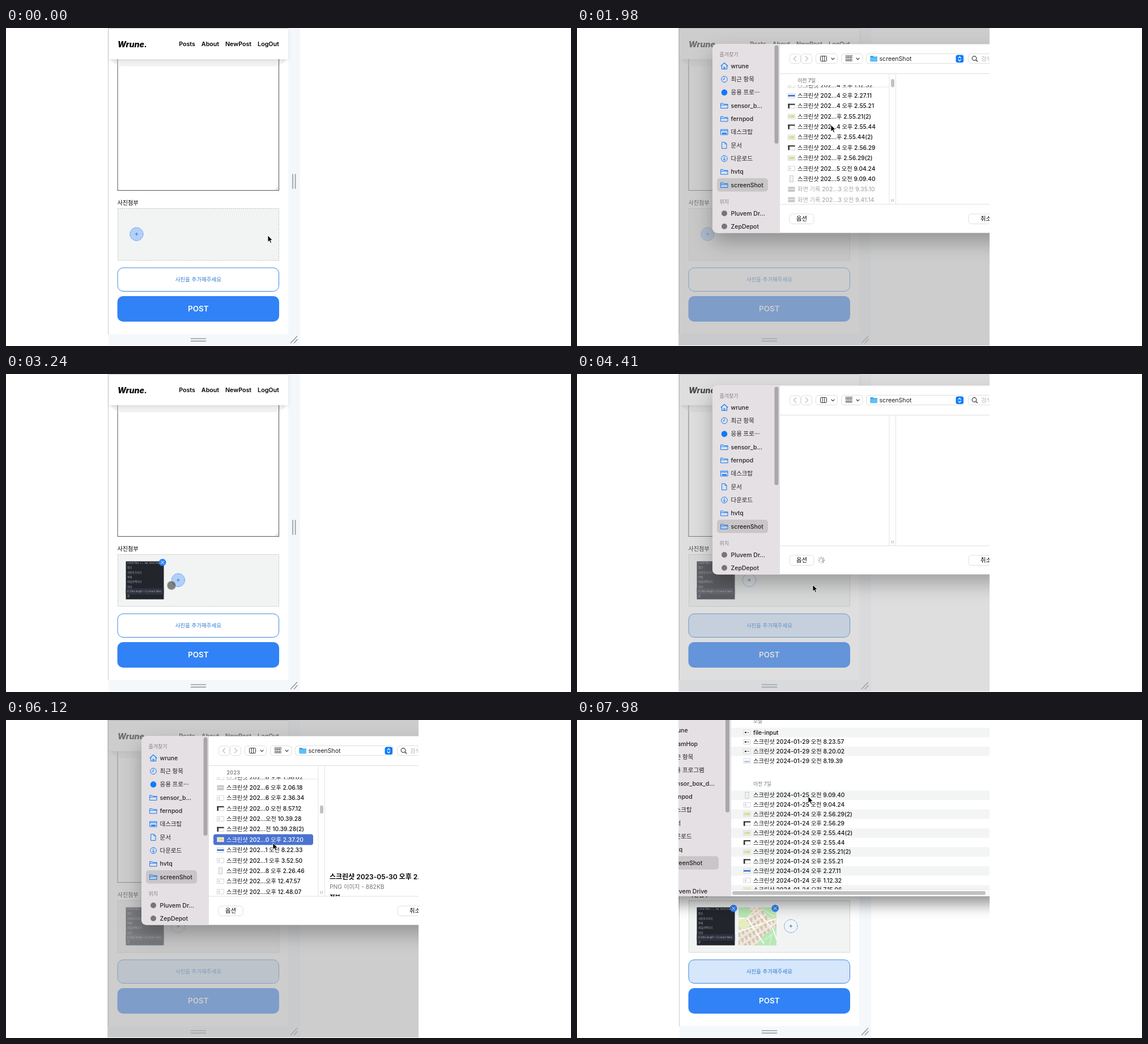
Write an HTML page that moves like this. It is 997x561 px and loops after 8 s.

```html
<!DOCTYPE html>
<html lang="ko">
<head>
<meta charset="utf-8">
<title>Photo upload</title>
<style>
html, body { margin: 0; width: 100%; height: 100%; overflow: hidden; background: #fff; }
svg { display: block; width: 100vw; height: 100vh; font-family: Inter, "Noto Sans CJK KR", "Noto Sans CJK", sans-serif; }
.line { fill: none; stroke-linecap: round; stroke-linejoin: round; }
.anim { animation: 8s linear infinite; }
.step { animation: 8s step-end infinite; }
#cursor { animation-name: pointer; animation-timing-function: ease-in-out; }
#arrow { animation-name: arrow; }
#touch { animation-name: touch; }
#dim { animation-name: dim; }
#sheet { animation-name: sheet; }
#files { animation-name: ready; }
#spinner { animation-name: busy; }
#spinner g { animation: spin .8s steps(8) infinite; }
#rows { animation-name: scroll; }
#thumb { animation-name: thumb; }
#week { animation-name: week; }
#year { animation-name: year; }
#pick1 { animation-name: pick1; }
#pick2 { animation-name: pick2; }
#photo1 { animation-name: photo1; }
#photo2 { animation-name: photo2; }
#plus { animation-name: plus; }
#plusFill { animation-name: plusFill; }
#hover { animation-name: hover; }
#finder { animation-name: finder; }
#sheetBase { filter: drop-shadow(0 16px 17px rgba(0,0,0,.28)); }
#finderBase { filter: drop-shadow(0 14px 13px rgba(0,0,0,.42)); }
#header { filter: drop-shadow(0 2px 3px rgba(0,0,0,.1)); }

@keyframes pointer {
  0%, 10.125% { transform: translate(462px, 366px); }
  14.25%, 17.5% { transform: translate(231px, 365px); }
  23.75%, 26% { transform: translate(448px, 171px); }
  31%, 35% { transform: translate(452px, 208px); }
  40%, 42% { transform: translate(292px, 373px); }
  48.75%, 52% { transform: translate(418px, 446px); }
  55%, 56% { transform: translate(416px, 372px); }
  63%, 67% { transform: translate(477px, 226px); }
  72%, 82% { transform: translate(471px, 217px); }
  87%, 92.6% { transform: translate(430px, 491px); }
  99.5%, 100% { transform: translate(408px, 135px); }
}
@keyframes arrow {
  0% { opacity: 1; } 10.125% { opacity: 0; } 16% { opacity: 1; } 38% { opacity: 0; }
  53% { opacity: 1; } 79.5% { opacity: 0; } 94.5%, 100% { opacity: 1; }
}
@keyframes touch {
  0% { opacity: 0; } 10.125% { opacity: 1; } 16% { opacity: 0; } 38% { opacity: 1; }
  53% { opacity: 0; } 79.5% { opacity: 1; } 94.5%, 100% { opacity: 0; }
}
@keyframes dim {
  0%, 15.75% { opacity: 0; } 19.75%, 35.25% { opacity: .62; } 38.5%, 52.5% { opacity: 0; }
  56.5%, 77.6% { opacity: .62; } 80.9%, 100% { opacity: 0; }
}
@keyframes sheet {
  0%, 15.75% { opacity: 0; transform: translateY(-27px); }
  17.25% { opacity: 1; }
  19.5%, 36% { opacity: 1; transform: translateY(0); }
  38.75% { opacity: 0; transform: translateY(-33px); }
  52.5% { opacity: 0; transform: translateY(-27px); }
  54% { opacity: 1; }
  56.25%, 78.375% { opacity: 1; transform: translateY(0); }
  81.125%, 100% { opacity: 0; transform: translateY(-33px); }
}
@keyframes ready { 0% { opacity: 0; } 21% { opacity: 1; } 40% { opacity: 0; } 59.25% { opacity: 1; } 82%, 100% { opacity: 0; } }
@keyframes busy { 0% { opacity: 1; } 21% { opacity: 0; } 40% { opacity: 1; } 59.25% { opacity: 0; } 82%, 100% { opacity: 1; } }
@keyframes spin { to { transform: rotate(360deg); } }
@keyframes scroll {
  0%, 21.5% { transform: translateY(0); }
  24.25%, 40% { transform: translateY(-55px); }
  40.01%, 59.5% { transform: translateY(0); animation-timing-function: ease-in-out; }
  66%, 67.5% { transform: translateY(-732.5px); animation-timing-function: ease-in-out; }
  72%, 100% { transform: translateY(-1523px); }
}
@keyframes thumb {
  0%, 21.5% { transform: translateY(0); }
  24.25%, 40% { transform: translateY(2.3px); }
  40.01%, 59.5% { transform: translateY(0); animation-timing-function: ease-in-out; }
  66%, 67.5% { transform: translateY(30.2px); animation-timing-function: ease-in-out; }
  72%, 100% { transform: translateY(62.8px); }
}
@keyframes week { 0% { opacity: 1; } 63.5% { opacity: 0; } 82%, 100% { opacity: 1; } }
@keyframes year { 0% { opacity: 0; } 63.5% { opacity: 1; } 82%, 100% { opacity: 0; } }
@keyframes pick1 { 0% { opacity: 0; } 31.875% { opacity: 1; } 40%, 100% { opacity: 0; } }
@keyframes pick2 { 0% { opacity: 0; } 73% { opacity: 1; } 82%, 100% { opacity: 0; } }
@keyframes photo1 { 0% { opacity: 0; } 39.75%, 100% { opacity: 1; } }
@keyframes photo2 { 0% { opacity: 0; } 82.875%, 100% { opacity: 1; } }
@keyframes plus {
  0% { transform: translateX(0); } 39.75% { transform: translateX(73.5px); }
  82.875%, 100% { transform: translateX(147px); }
}
@keyframes plusFill { 0% { opacity: 1; } 43.5%, 100% { opacity: 0; } }
@keyframes hover { 0% { opacity: 0; } 47.25%, 100% { opacity: 1; } }
@keyframes finder { 0% { opacity: 0; } 88.125%, 100% { opacity: 1; } }
</style>
</head>
<body>
<svg viewBox="0 0 997 561" preserveAspectRatio="none">
  <defs>
    <clipPath id="stage"><rect x="179" width="549" height="560"/></clipPath>
    <clipPath id="listArea"><rect x="359" y="101" width="191" height="209.5"/></clipPath>
    <clipPath id="infoArea"><rect x="563" y="81" width="200" height="229.5"/></clipPath>
    <clipPath id="finderArea"><rect x="272" width="456" height="299"/></clipPath>
    <clipPath id="photoArea"><rect x="211.5" y="330.5" width="67" height="67"/></clipPath>
    <pattern id="blocks" width="8" height="11" patternUnits="userSpaceOnUse" patternTransform="rotate(-32)">
      <path d="M1.2 1.5H6.5V5.5H4.5V9H1.2Z" fill="#d3c3b4"/>
    </pattern>
    <g id="badge">
      <circle r="6.3" fill="#3182f6"/>
      <path class="line" d="M-2.6-2.6 2.6 2.6M2.6-2.6-2.6 2.6" stroke="#fff"/>
    </g>
  </defs>
  <g clip-path="url(#stage)">
    <g id="page"></g>
    <rect id="dim" class="anim" x="179" width="549" height="560" fill="#aeaeae"/>
    <g id="sheet" class="anim"></g>
    <g id="finder" class="step"></g>
    <g id="cursor" class="anim">
      <path id="arrow" class="step" d="M0 0V11.6L2.7 9.1 4.5 13.3 6.5 12.4 4.7 8.3H8.3Z" stroke="#fff" stroke-width=".8"/>
      <circle id="touch" class="step" r="8" fill="#484848" fill-opacity=".66" stroke="#fff" stroke-opacity=".6"/>
    </g>
  </g>
</svg>
<script>
const BLUE = '#0a7aff';
const byId = id => document.getElementById(id);
const rect = (x, y, w, h, fill, more = '') =>
  `<rect x="${x}" y="${y}" width="${w}" height="${h}" fill="${fill}" ${more}/>`;
const text = (x, y, size, label, more = '') =>
  `<text x="${x}" y="${y}" dy=".36em" font-size="${size}" ${more}>${label}</text>`;
const line = (d, color, width = 1, more = '') =>
  `<path class="line" d="${d}" stroke="${color}" stroke-width="${width}" ${more}/>`;
const at = (x, y, body) => `<g transform="translate(${x} ${y})">${body}</g>`;
const MID = 'text-anchor="middle"';

// Page
const nav = [[319.5, 'Posts'], [360.5, 'About'], [410, 'NewPost'], [463, 'LogOut']];
const code = ['const files = [...list, next].map(toItem)', '함수', '사진추가하기', '목록', '파일선택하기', '미리', 'if (files.length > 5) return false', '끝'];
const darkPhoto = `<g clip-path="url(#photoArea)">${rect(211, 330, 68, 68, '#23252d')}${rect(211, 378, 68, 11, '#30333f')}` +
  code.map((s, i) => text(214, 333.5 + i * 8.3, i % 6 ? 4.6 : 4.2, s, 'fill="#a9adb8"')).join('') + '</g>';
const mapPhoto = at(73.5, 0, `<g clip-path="url(#photoArea)">${rect(211, 330, 68, 68, '#f0e8dc')}${rect(211, 330, 68, 68, 'url(#blocks)')}
  <path d="M211 330H229L236 340 224 350 211 346ZM250 330H279V353L264 348ZM279 364V398H242L256 380Z" fill="#b9e8b6"/>
  <path d="M211 352 221 348 232 362 219 371 211 364Z" fill="#e3efc0"/>
  ${line('M254 334 274 346M258 388 279 372M266 398 270 379', '#dff4dc', 1.2)}
  ${line('M211 350 226 350 245 330M227 350 256 394M211 374 279 350M246 341 272 368 279 388', '#fff', 1.8)}
  ${line('M211 361 236 340 250 330M240 372 262 354 279 343', '#f3e3a6', 1.4)}</g>`);

byId('page').innerHTML = `
  ${rect(181, 0, 338, 560, '#f5f8fb')}${rect(181, 0, 317, 540, '#fff')}
  ${line('M180.5 0V540M181 .5H498', '#c9c9c9')}
  <rect x="182" y="20" width="315" height="47.5" rx="24" fill="#f1f1f1"/>
  ${rect(197, 40, 284.5, 246.5, 'none', 'stroke="#555"')}
  ${rect(197.5, 55, 283.5, 12, '#f1f1f1')}
  ${line('M476 285 480 281M479 285 480 284', '#888', .7)}
  ${rect(181, 1, 317, 54, '#fff', 'id="header"')}
  ${text(197, 28.5, 14.2, 'Wrune.', 'font-weight="800" font-style="italic"')}
  ${nav.map(([x, s]) => text(x, 28.5, 10.7, s, MID + ' font-weight="600"')).join('')}
  ${text(196.5, 308.5, 10.1, '사진첨부', 'font-weight="500"')}
  ${rect(197.5, 318.5, 284, 91.5, '#f2f4f4', 'stroke="#b9bcbc" stroke-dasharray="2 1.5"')}
  <g id="photo1" class="step">${darkPhoto}${at(276.2, 332.3, '<use href="#badge"/>')}</g>
  <g id="photo2" class="step">${mapPhoto}${at(349.7, 332.3, '<use href="#badge"/>')}</g>
  <g id="plus" class="step">
    <circle id="plusFill" class="step" cx="230.4" cy="363.6" r="11.6" fill="#b3d0f8"/>
    <circle cx="230.4" cy="363.6" r="11.6" fill="none" stroke="#3182f6" stroke-dasharray="2 1.2"/>
    ${line('M228 363.6H232.8M230.4 361.2V366', '#3176d8')}
  </g>
  <rect x="197" y="423" width="284.5" height="41.5" rx="10" fill="#fff"/>
  <rect id="hover" class="step" x="197" y="423" width="284.5" height="41.5" rx="10" fill="#d6e6fb"/>
  ${rect(197, 423, 284.5, 41.5, 'none', 'rx="10" stroke="#3b86d8"')}
  ${text(339.3, 443.5, 9.5, '사진을 추가해주세요', MID + ' fill="#2f7bd2"')}
  ${rect(196.5, 473, 285.5, 45, '#3182f6', 'rx="10"')}
  ${text(339.3, 495.5, 13.4, 'POST', MID + ' fill="#fff" font-weight="600"')}
  ${line('M506 258V283M510.6 258V283M326.5 548H352.5M326.5 552.3H352.5M502.5 555.5 513.5 544M508.5 555.5 514 549.5', '#989ca1', 1.7)}`;

// File dialog
const folder = line('M-6-4H-2L-.5-2.5H6V4.5H-6ZM-6-1H6', BLUE);
const disc = `<circle r="5.3" fill="${BLUE}"/>`;
const greyDisc = '<circle r="5" fill="#77747a"/>';
const ring = '<circle r="5.3" fill="none" stroke="#0a7aff"/>';
const places = [
  ['wrune', line('M-6 0 0-5.5 6 0M-4.5-1V5.5H4.5V-1M-1 5V2H1V5', BLUE, 1.1)],
  ['최근 항목', ring + line('M0-3V.5H-2.5', BLUE)],
  ['응용 프로···', disc],
  ['sensor_b...', folder],
  ['fernpod', folder],
  ['데스크탑', line('M-6-4.5H6V4.5H-6ZM-6-2.5H6', BLUE) + rect(-4, 1, 8, 2.4, BLUE)],
  ['문서', line('M-4-5.5H1L4-2.5V5.5H-4ZM1-5.5V-2.5H4', BLUE)],
  ['다운로드', ring + line('M0-3V3M-2 1 0 3 2 1', BLUE)],
  ['hvtq', folder],
  ['screenShot', folder],
];
const placeName = (x, y, label) => text(x, y, 10.5, label, 'fill="#232123" font-weight="450"');
const place = ([label, icon], y) => at(260, y, icon) + placeName(271.5, y, label);

const frame = rect(-6, -4, 12, 8, '#fff', 'stroke="#c4c4c4" stroke-width=".7"');
const icons = {
  strip: frame + rect(-6, -1.5, 12, 3, '#3f78d8'),
  pale: frame + rect(-4.5, 0, 9, 2.5, '#9cc3ea'),
  dark: frame + rect(-6, -4, 12, 2, '#333') + rect(-6, -4, 2.5, 8, '#333'),
  dash: frame + rect(-4, -1.2, 3, 2.4, '#333') + rect(0, -.7, 4, 1.4, '#8a8a8a'),
  map: frame + rect(-5, -2.5, 10, 5, '#d9dfb4') + rect(0, -2, 4, 3, '#ead66a'),
  video: rect(-6, -4.5, 12, 9, '#c9c9c9') + rect(-5, -1, 10, 1.2, '#f4f4f4'),
  doc: rect(-4.5, -5.5, 9, 11, '#fff', 'stroke="#d0d0d0" stroke-width=".7"') + rect(-2.5, -1.5, 5, 3, '#5a6a85') + rect(-1, 0, 4, 2.5, '#8698b4'),
  plain: frame + rect(-4, -2, 3, 4, '#cbd9ee'),
  tall: rect(-3, -5.5, 6, 11, '#f2f2f2', 'stroke="#b5b5b5" stroke-width=".7"'),
};
const shots = (kinds, names) => names.map((name, i) => ['스크린샷 202' + name, kinds[i % kinds.length]]);
const filler = n => shots(['doc'], Array.from({ length: n }, (_, i) =>
  `...${i % 9} 오${i % 3 ? '후' : '전'} ${1 + i * 7 % 9}.${10 + i * 13 % 50}.${10 + i * 29 % 50}`));
const files = [
  ...filler(3),
  ...shots(['plain', 'strip', 'dark', 'map', 'dark', 'map', 'dark', 'map', 'plain', 'tall'],
    ['...4 오후 1.12.32', '...4 오후 2.27.11', '...4 오후 2.55.21', '...후 2.55.21(2)', '...4 오후 2.55.44',
     '...후 2.55.44(2)', '...4 오후 2.56.29', '...후 2.56.29(2)', '...5 오전 9.04.24', '...5 오전 9.09.40']),
  ['화면 기록 202...3 오전 9.35.10', 'video'],
  ['화면 기록 202...3 오전 9.41.14', 'video'],
  ...filler(25),
  ...shots(['doc'],
    ['...3 오전 9.01.30', '...3 오전 9.01.40', '...3 오후 2.54.39', '...3 오후 2.55.18', '...3 오후 2.56.24',
     '...4 오후 1.16.45', '...4 오후 3.48.05', '...4 오후 3.49.01', '3...오전 10.51.08', '...5 오후 2.04.16',
     '...6 오후 3.48.27', '...7 오후 3.55.28']),
  ...filler(31),
  ...shots(['plain', 'video', 'plain', 'dark', 'plain', 'dark', 'map', 'strip', 'plain', 'tall', 'plain', 'plain'],
    ['...6 오후 1.58.02', '...6 오후 2.06.18', '...6 오후 2.36.34', '...0 오전 8.57.12', '...오전 10.39.28',
     '...전 10.39.28(2)', '...0 오후 2.37.20', '...1 오전 8.22.33', '...1 오후 3.52.50', '...8 오후 2.26.46',
     '...오후 12.47.57', '...오후 12.48.07']),
  ...filler(8),
];
const fileName = (x, y, name, color = '#111') => text(x, y, 10.25, name, `fill="${color}" font-weight="450"`);
const fileRow = ([name, kind], y, color = name[0] === '화' ? '#a9a9a9' : '#111') =>
  at(378.5, y, icons[kind]) + fileName(389, y, name, color);

const pick = (id, file, title, size) => `<g id="${id}" class="step">
  ${rect(366, 201.5, 176, 19, '#4a72d0', 'rx="4"')}${fileRow(file, 211, '#fff')}
  <g clip-path="url(#infoArea)">
    ${text(571, 277, 12, title, 'font-weight="600"')}
    ${text(571, 294, 10.3, `PNG 이미지 - ${size}`, 'fill="#777"')}
    ${text(571, 312, 10.3, '정보', 'font-weight="600"')}
  </g></g>`;

const pill = (x, y, w, h) => rect(x, y, w, h, '#fff', 'rx="4.5" stroke="#dedede"');
const chevron = (x, y) => line(`M${x - 2.5} ${y - 1.2} ${x} ${y + 1.3} ${x + 2.5} ${y - 1.2}`, '#333', 1.3);
const dots = [0, 1, 2, 3, 4, 5].map(i =>
  rect(474.5 + i % 3 * 4, i < 3 ? 50.5 : 55.5, 2.6, 2.6, 'none', 'stroke="#444" stroke-width=".8"')).join('') +
  line('M474 48.5H486', '#444', .8);
const spokes = Array.from({ length: 8 }, (_, i) =>
  line('M0-2.8V-5.8', '#555', 1.3, `opacity="${.25 + i * .09}" transform="rotate(${i * 45})"`)).join('');

byId('sheet').innerHTML = `
  ${rect(239, 28.5, 760, 333, '#fff', 'rx="9" id="sheetBase"')}
  <path d="M358 28.5V361.5H248Q239 361.5 239 352.5V37.5Q239 28.5 248 28.5Z" fill="#e5e0e3"/>
  ${rect(348.5, 30.5, 7, 173.5, '#aaa6a9', 'rx="3.5"')}
  ${text(251.5, 47, 9, '즐겨찾기', 'fill="#858085" font-weight="500"')}
  ${rect(247, 265, 90, 23.5, '#c9c6c8', 'rx="5"')}
  ${places.map((p, i) => place(p, 67 + i * 23.33)).join('')}
  ${text(251.5, 307, 9, '위치', 'fill="#858085" font-weight="500"')}
  ${place(['Pluvem Dr...', greyDisc], 327)}${place(['ZepDepot', greyDisc], 350)}
  ${pill(375.5, 46, 19, 16.5)}${pill(395.5, 46, 19, 16.5)}
  ${line('M386.5 50 382.5 54.2 386.5 58.4M403.5 50 407.5 54.2 403.5 58.4', '#b8b8b8', 1.2)}
  ${pill(421.5, 45.5, 38, 17)}${rect(429.5, 49.5, 11, 9, 'none', 'stroke="#333" rx="1"')}
  ${line('M433.2 50V58M436.8 50V58', '#333')}${chevron(451.5, 54.3)}
  ${pill(466.5, 45.5, 37.5, 17)}${dots}${chevron(495.5, 54.3)}
  ${pill(510.5, 45.5, 173, 17)}
  <path d="M517.5 49H522L523.5 50.5H530V59H517.5Z" fill="#3aa5e6"/>${rect(517.5, 52, 12.5, 7.5, '#5fc0f4', 'rx="1"')}
  ${text(533.5, 54, 10.6, 'screenShot', 'fill="#222"')}
  ${rect(668.5, 47.5, 13.5, 13.5, BLUE, 'rx="3.5"')}
  ${line('M673 53 675.2 50.5 677.4 53M673 55.7 675.2 58.2 677.4 55.7', '#fff', 1.3)}
  ${pill(690.5, 45.5, 120, 17)}
  <circle cx="701" cy="53.5" r="3.8" fill="none" stroke="#333" stroke-width="1.2"/>${line('M704 56.5 706.5 59', '#333', 1.3)}
  ${text(713, 54, 10.3, '검색', 'fill="#b5b5b5"')}
  ${line('M358 80.5H760M358 311H760', '#dfdfdf')}
  ${line('M551 81V310.5M562.5 81V310.5', '#e2e2e2')}${line('M555.5 302V306.5M558.3 302V306.5', '#aaa', .9)}
  <g id="files" class="step">
    <g clip-path="url(#listArea)"><g id="rows" class="anim">
      ${files.map((f, i) => fileRow(f, 101 + i * 18.35)).join('')}
    </g></g>
    ${text(389.5, 92.5, 8.8, '이전 7일', 'id="week" class="step" fill="#666" font-weight="500"')}
    ${text(389.5, 92.5, 8.8, '2023', 'id="year" class="step" fill="#666" font-weight="500" letter-spacing=".4"')}
    ${line('M389 104.2H551', '#e6e6e6')}
    ${rect(554, 87.7, 6, 14.5, '#c1c1c1', 'rx="3" id="thumb" class="anim"')}
    ${pick('pick1', files[9], '스크린샷 2024-01-24 오후 2.56.29', '514KB')}
    ${pick('pick2', files[89], '스크린샷 2023-05-30 오후 2.37.20', '882KB')}
  </g>
  ${pill(375, 328, 43, 17.5)}${text(396.5, 336.5, 10.3, '옵션', MID)}
  ${at(431, 336.5, `<g id="spinner" class="step"><g>${spokes}</g></g>`)}
  ${pill(691, 328, 62, 17.5)}${text(712, 336.5, 10.3, '취소')}`;

// File browser window
const sidebar = ['wrune', 'BeamHop', '최근 항목', '응용 프로그램', 'sensor_box_d...', 'fernpod', '데스크탑', '문서', '다운로드', 'hvtq', 'screenShot'];
const today = [['file-input', 'dash'], ['29 오전 8.23.57', 'dash'], ['29 오전 8.20.02', 'dash'], ['29 오전 8.19.39', 'pale']];
const week = [
  ['25 오전 9.09.40', 'tall'], ['25 오전 9.04.24', 'plain'], ['24 오후 2.56.29(2)', 'map'], ['24 오후 2.56.29', 'dark'],
  ['24 오후 2.55.44(2)', 'map'], ['24 오후 2.55.44', 'dark'], ['24 오후 2.55.21(2)', 'map'], ['24 오후 2.55.21', 'dark'],
  ['24 오후 2.27.11', 'strip'], ['24 오후 1.12.32', 'plain'], ['24 오전 7.15.06', 'map'],
];
const wideRows = (items, top) => items.map(([name, kind], i) => {
  const y = top + i * 16.68;
  const label = name === 'file-input' ? name : '스크린샷 2024-01-' + name;
  return (i % 2 ? '' : rect(272, y - 8.3, 460, 16.7, '#f3f5f4')) + at(300, y, icons[kind]) + fileName(311, y, label);
}).join('');

byId('finder').innerHTML = `
  ${rect(100, -60, 700, 371, '#fff', 'id="finderBase"')}
  ${rect(100, -60, 172, 371, '#e5e0e3')}
  ${rect(262, -20, 7, 183, '#aaa6a9', 'rx="3.5"')}
  ${rect(140, 240.3, 110, 23.5, '#c9c6c8', 'rx="5"')}
  ${sidebar.map((s, i) => placeName(164, 18.7 + i * 23.33, s)).join('')}
  ${placeName(164, 302, 'Pluvem Drive')}
  <g clip-path="url(#finderArea)">
    ${text(311, 2, 8.8, '오늘', 'fill="#777"')}${wideRows(today, 22)}
    ${text(311, 112.5, 8.8, '이전 7일', 'fill="#777"')}${wideRows(week, 132.7)}
  </g>
  ${rect(272, 299, 460, 12, '#fafafa')}${line('M272 299H730', '#e4e4e4', .8)}
  ${rect(274, 302, 447, 6.5, '#c0c0c0', 'rx="3.2"')}`;
</script>
</body>
</html>
```
